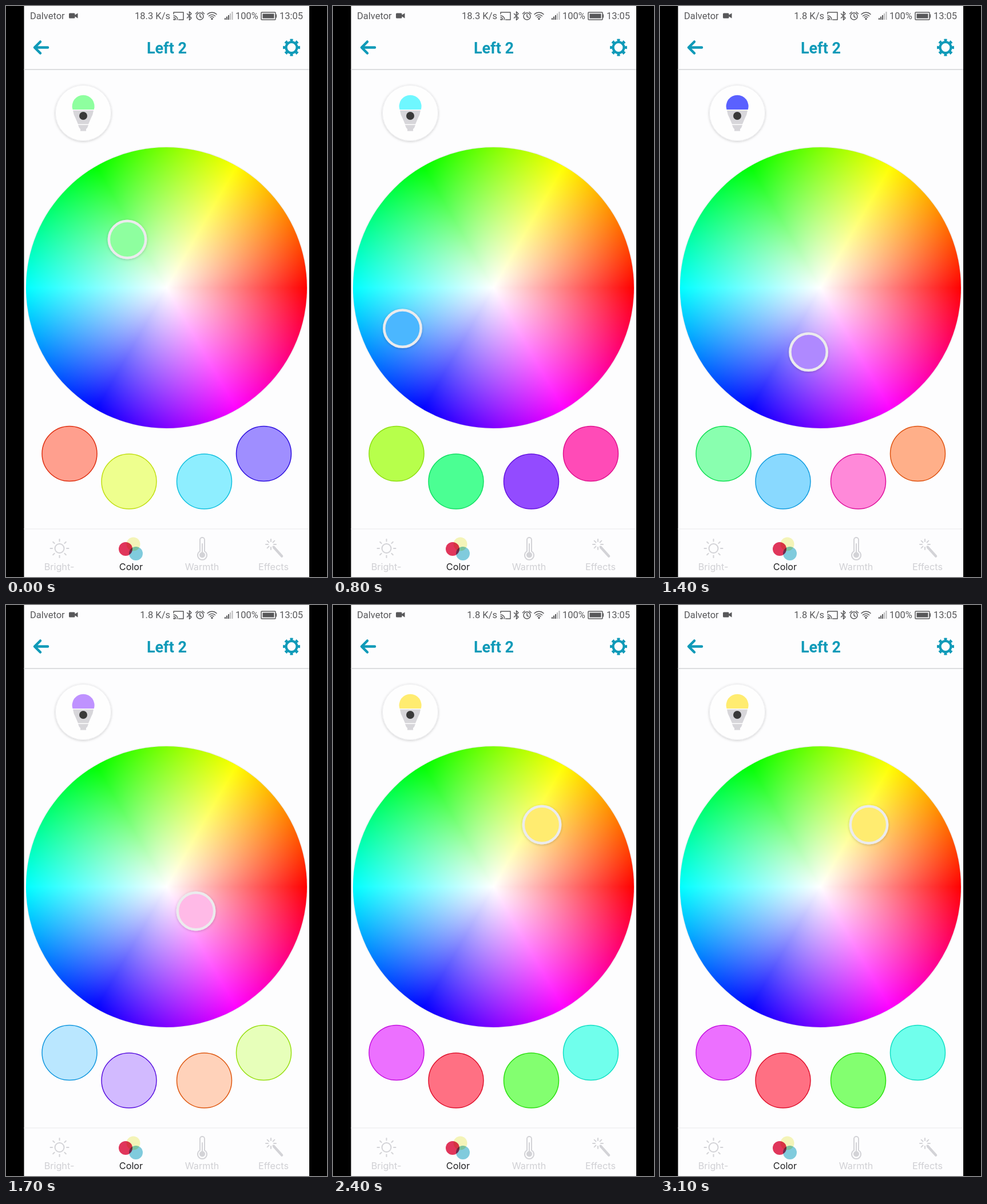
An HTML page for the animation above (3.7 s loop, 561 by 998 pixels).

```html
<!DOCTYPE html>
<html lang="en">
<head>
<meta charset="utf-8">
<title>Bulb colour picker</title>
<style>
  html, body { margin: 0; width: 100%; height: 100%; overflow: hidden; background: #fdfdfe; }
  #wheel {
    position: absolute; left: 35px; top: 247px; width: 491px; height: 491px; border-radius: 50%;
    background:
      radial-gradient(closest-side, #fff, #fff0),
      conic-gradient(from 90deg, #f00, #f0f, #00f, #0ff, #0f0, #ff0, #f00);
    box-shadow: 0 0 1.5px #a9b0b8;
  }
  svg { position: absolute; left: 0; top: 0; width: 561px; height: 998px; }
  text { font-family: Roboto, sans-serif; }
  .line { fill: none; stroke-linecap: round; stroke-linejoin: round; }
  .status { fill: #58585a; font-size: 16.5px; }
  .thin { stroke: #58585a; stroke-width: 1.5; }
  .brand { stroke: #0f9ab8; }
  .muted { stroke: #d3d3d7; stroke-width: 2; }
  .tabs text { font: 16.2px Inter, sans-serif; text-anchor: middle; fill: #d0d0d4; }
  .blend { isolation: isolate; }
  .blend circle { mix-blend-mode: multiply; }
</style>
</head>
<body>
<div id="wheel"></div>
<svg viewBox="0 0 561 998">
  <defs>
    <filter id="soft" x="-30%" y="-30%" width="160%" height="160%">
      <feDropShadow dx="0" dy="1" stdDeviation="2" flood-opacity=".2"/>
    </filter>
  </defs>
  <path d="M0 0H31.5V998H0zM530 0H561V998H530z"/>
  <path d="M31.5 111H530" stroke="#dcdde0" stroke-width="2"/>
  <path d="M31.5 914H530" stroke="#f0f0f2" stroke-width="1.5"/>

  <g class="status">
    <text x="42" y="23">Dalvetor</text>
    <text id="speed" x="287" y="23" text-anchor="end">18.3 K/s</text>
    <text x="401" y="23">100%</text>
    <text x="478" y="23">13:05</text>
    <rect x="110" y="12.5" width="10.5" height="9" rx="1.5"/>
    <path d="M120 16L125.500 12.500V21.500L120 18z"/>
    <circle cx="294" cy="23.500" r="1.600"/>
    <rect x="448.500" y="13.500" width="20" height="8"/>
    <path d="M471 14.500H473V20.500H471z"/>
    <path d="M382 21H384V24H382zM385 18.500H387V24H385zM388 16H390V24H388z"/>
    <path d="M391 13H393V24H391zM394.500 10H396.500V24H394.500z" opacity=".4"/>
    <circle cx="360" cy="22.500" r="1.700"/>
  </g>
  <g class="line thin">
    <path d="M293 14V11H310V24H302M293 20A4 4 0 0 1 297 24M293 17A7 7 0 0 1 300 24"/>
    <path d="M316.500 13.500L324 21L320.500 24.500V10L324 13.500L316.500 21"/>
    <circle cx="339" cy="18" r="6"/>
    <path d="M339 14.500V18.500L341.500 20M331.500 13.500L335 10.500M343 10.500L346.500 13.500"/>
    <path d="M352 14.500A11.500 11.500 0 0 1 368 14.500M354.500 17.500A7.700 7.700 0 0 1 365.500 17.500M357 20A4.300 4.300 0 0 1 363 20"/>
    <rect x="446" y="11" width="25" height="13" rx="1"/>
  </g>

  <text x="281" y="83" text-anchor="middle" font-size="27" font-weight="700" fill="#0f9ab8">Left 2</text>
  <g class="line brand">
    <path d="M73 72.500H51M60 62.500L50 72.500L60 82.500" stroke-width="4.500"/>
    <circle cx="499" cy="72.500" r="9.500" stroke-width="4.200"/>
    <circle cx="499" cy="72.500" r="12.700" stroke-width="4.500" pathLength="80"
      stroke-dasharray="5 5" stroke-dashoffset="2.500" stroke-linecap="butt"/>
  </g>

  <circle cx="135" cy="187" r="48.500" fill="#fefefe" stroke="#eeeef0" filter="url(#soft)"/>
  <path id="dome" d="M116.500 181A19.500 19.500 0 1 1 153.700 181z"/>
  <path d="M117 182.500H153Q152 190 148.500 196L144 206.500H126L121.500 196Q118 190 117 182.500z
    M126 208H144L142 213L140 215V218.500H130V215L128 213z" fill="#d7d6da"/>
  <circle cx="135" cy="192" r="7" fill="#393939"/>

  <g id="swatches" stroke-width="1.500"></g>
  <circle id="handle" r="32.200" stroke="#ebebed" stroke-width="4.500" filter="url(#soft)"/>

  <g class="tabs">
    <text x="93" y="986">Bright-</text>
    <text x="218.500" y="986" style="fill:#202022">Color</text>
    <text x="342.500" y="986">Warmth</text>
    <text x="467.500" y="986">Effects</text>
  </g>
  <g class="blend">
    <circle cx="222.500" cy="940.500" r="12" fill="#f4f4b8"/>
    <circle cx="209" cy="949" r="12" fill="#e0365b"/>
    <circle cx="227" cy="957" r="12" fill="#80cbdd"/>
  </g>
  <g class="line muted">
    <circle cx="93.500" cy="948" r="8"/>
    <g id="rays"></g>
    <path d="M339 953V933A4 4 0 0 1 347 933V953A8 8 0 1 1 339 953zM343 940V958"/>
    <circle cx="343" cy="959.500" r="4" fill="#d3d3d7"/>
    <path d="M468 946L482 961.500" stroke-width="4.500"/>
    <g id="sparks"></g>
  </g>
</svg>
<script>
const $ = id => document.getElementById(id);
const LOOP = 3700, STEP = 100;
const CENTER = [280.5, 493], RADIUS = 246;

// One drag path; the bulb travels it later than the finger.
const path = [
  [212, 408], [171, 464], [136, 511], [124, 576], [183, 627],
  [271, 598], [332, 535], [374, 464], [365, 386], [365, 384]
];
const fingerKeys = [[0, 0], [500, 0], [600, 2], [850, 3], [1100, 4], [1450, 5], [1700, 6], [1850, 7], [2100, 8], [2200, 9]];
const bulbKeys = [[0, 0], [500, 0], [600, 1], [850, 2], [1100, 3], [1350, 4], [1700, 5], [1950, 6], [2100, 7], [2400, 9]];
const swatchSpots = [[111, 782.5, -120], [215, 831, -60], [346.5, 831, 60], [450.5, 782.5, 120]];

function make(tag, parent, attrs) {
  const node = document.createElementNS(parent.namespaceURI, tag);
  for (const name in attrs) node.setAttribute(name, attrs[name]);
  return parent.appendChild(node);
}

function burst(parent, x, y, inner, outer) {
  for (let i = 0; i < 8; i++) {
    make('path', parent, { d: `M${inner} 0H${outer}`, transform: `translate(${x} ${y}) rotate(${i * 45})` });
  }
}

function progress(keys, t) {
  const i = keys.findIndex(key => key[0] > t);
  if (i < 0) return keys[keys.length - 1][1];
  const [t0, a] = keys[i - 1], [t1, b] = keys[i];
  return a + (b - a) * (t - t0) / (t1 - t0);
}

// Catmull-Rom spline through the path points.
function pointAt(u) {
  const i = Math.min(Math.floor(u), path.length - 2), f = u - i;
  const at = k => path[Math.max(0, Math.min(path.length - 1, k))];
  return [0, 1].map(axis => {
    const [a, b, c, d] = [-1, 0, 1, 2].map(k => at(i + k)[axis]);
    return b + f / 2 * (c - a + f * (2 * a - 5 * b + 4 * c - d + f * (3 * (b - c) + d - a)));
  });
}

function wheelColor([x, y]) {
  const dx = x - CENTER[0], dy = CENTER[1] - y;
  return { hue: Math.atan2(dy, dx) * 180 / Math.PI, sat: Math.min(1, Math.hypot(dx, dy) / RADIUS) };
}

// Full-value HSV written as HSL.
const tint = (hue, sat) => `hsl(${hue} 100% ${100 - sat * 50}%)`;
const rim = hue => `hsl(${hue} 86% 47%)`;

burst($('rays'), 93.5, 948, 12.5, 16);
burst($('sparks'), 463, 941, 5, 9);
const swatches = swatchSpots.map(([cx, cy]) => make('circle', $('swatches'), { cx, cy, r: 48 }));

function draw(time) {
  const t = Math.floor(time % LOOP / STEP) * STEP;
  const spot = pointAt(progress(fingerKeys, t));
  const { hue, sat } = wheelColor(spot);
  const bulb = wheelColor(pointAt(progress(bulbKeys, t)));

  $('handle').setAttribute('cx', spot[0]);
  $('handle').setAttribute('cy', spot[1]);
  $('handle').setAttribute('fill', tint(hue, sat));
  $('dome').setAttribute('fill', tint(bulb.hue, bulb.sat));
  swatches.forEach((swatch, i) => {
    const turned = hue + swatchSpots[i][2];
    swatch.setAttribute('fill', tint(turned, sat));
    swatch.setAttribute('stroke', rim(turned));
  });
  $('speed').textContent = t < 1400 ? '18.3 K/s' : '1.8 K/s';
}

const start = performance.now();
function tick() {
  draw(performance.now() - start);
  requestAnimationFrame(tick);
}
tick();
</script>
</body>
</html>
```
